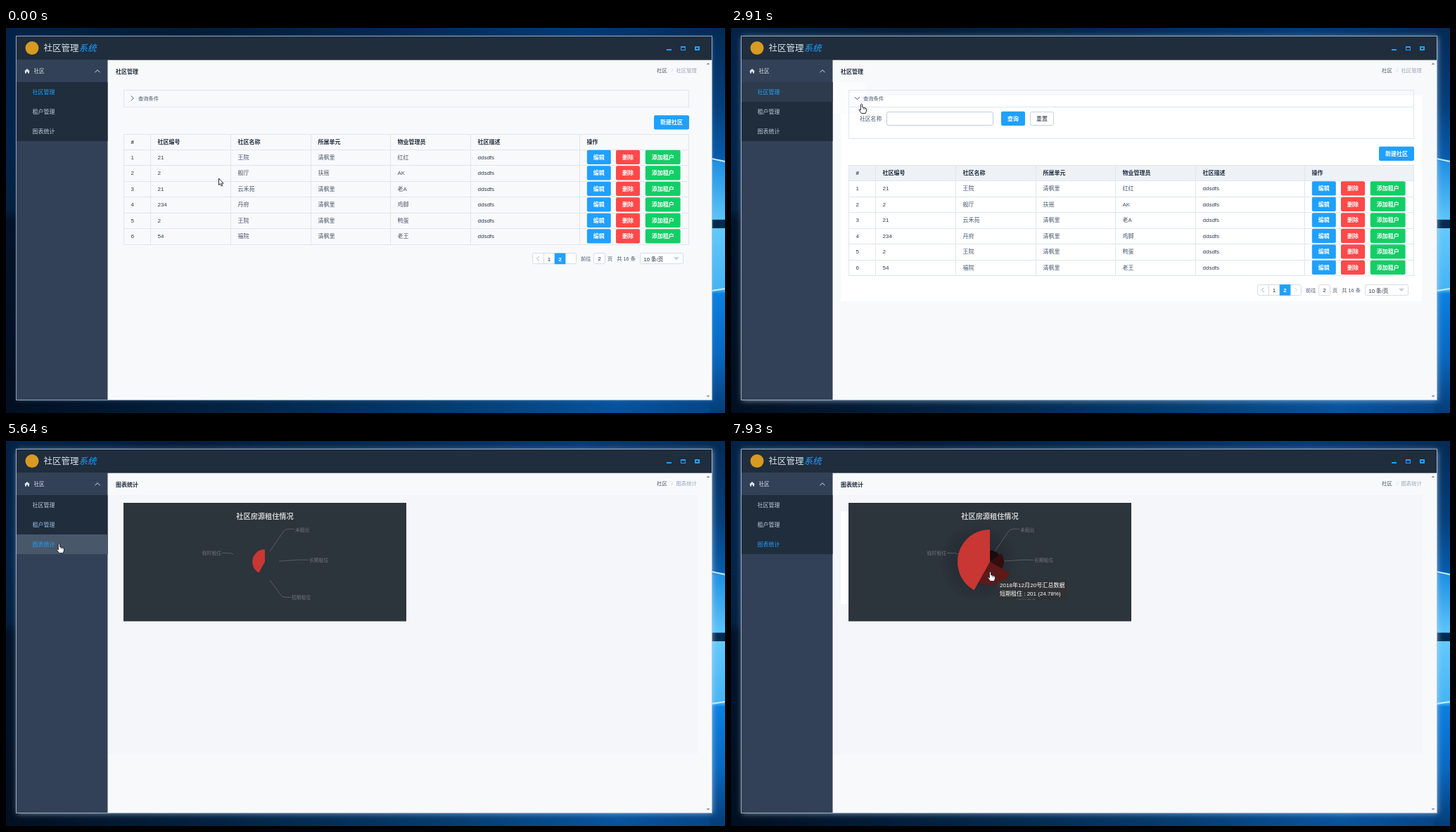
Write an HTML page with a canvas that moves like this. It is 1022 px wide and 548 px high and loops after 8 s.

```html
<!DOCTYPE html>
<html lang="zh">
<head>
<meta charset="utf-8">
<title>社区管理系统</title>
<style>
html, body { margin: 0; width: 100%; height: 100%; overflow: hidden; background: #03162c; }
canvas { display: block; width: 1022px; height: 548px; }
</style>
</head>
<body>
<canvas id="stage" width="1022" height="548"></canvas>
<script>
const c = document.getElementById('stage').getContext('2d');
const LOOP = 8000;
const FONT = '"Liberation Sans", "Noto Sans CJK SC", "Noto Sans CJK", sans-serif';
const BLUE = '#20a0ff', RED = '#ff4949', GREEN = '#13ce66';
const INK = '#1f2d3d', BODY = '#48576a', LINE = '#dfe6ec', EDGE = '#c4d0dd', SIDE = '#324157';

// The picture only changes at these moments.
const TICKS = [0, 120, 240, 520, 650, 790, 930, 1060, 1200, 1330,
  1640, 1760, 1880, 2030, 2180, 2340, 2490, 2760, 2910, 3030, 3150, 3270, 3420,
  3710, 3830, 3980, 4120, 4240, 4520, 4640, 4780, 4920, 5060, 5210,
  5520, 5640, 5760, 5880, 6010, 6150, 6290, 6430, 6550,
  6670, 6790, 6940, 7080, 7210, 7350, 7490, 7630, 7780, 7930];
const FOCUS = 1640, OPEN = 1719, TENANT = 4520, CHART = 5520;
const DROP = 44.5;

// Pointer path: time, x, y.
const PATH = [
  [0, 302, 214], [240, 155, 153], [390, 155, 153], [1330, 180, 100],
  [2640, 180, 100], [2910, 185, 108], [3150, 110, 108], [3420, 96, 119],
  [3600, 96, 119], [4240, 83, 114], [4700, 83, 114], [5210, 75, 146],
  [5760, 75, 146], [6290, 340, 150], [6430, 360, 154], [6550, 365, 156],
  [6670, 369, 159], [7080, 374, 167], [7490, 378, 177], [7630, 378, 179], [7930, 368, 186]
];

const COMMUNITY = {
  cols: [167, 205, 319, 433, 546, 660, 815],
  heads: ['#', '社区编号', '社区名称', '所属单元', '物业管理员', '社区描述', '操作'],
  rows: [
    ['1', '21', '王院', '清枫里', '红红'], ['2', '2', '舰厅', '扶摇', 'AK'],
    ['3', '21', '云禾苑', '清枫里', '老A'], ['4', '234', '丹府', '清枫里', '鸡脚'],
    ['5', '2', '王院', '清枫里', '鸭蛋'], ['6', '54', '福院', '清枫里', '老王']
  ]
};
const TENANTS = {
  cols: [167, 205, 319, 433, 546, 660, 773],
  heads: ['#', '租户编号', '租户姓名', '小区名称', '所属单元', '物业管理员', '操作']
};
const MENU = ['社区管理', '租户管理', '图表统计'];
const SLICES = [
  { name: '未租出', value: 122, color: '#1c0a0c', start: 5650, hover: [6670, 7000] },
  { name: '长期租住', value: 148, color: '#340d10', start: 5700, hover: [7000, 7550] },
  { name: '短期租住', value: 201, color: '#5e1918', start: 5740, hover: [7550, 9000] },
  { name: '临时租住', value: 340, color: '#c83733', start: 5600, hover: [6290, 6670] }
];
const TOTAL = 811;

const clamp = k => Math.max(0, Math.min(1, k));
const smooth = k => (k = clamp(k), k * k * (3 - 2 * k));
const lerp = (a, b, k) => a + (b - a) * k;
const pulse = (t, from, to, d) => clamp((t - from) / d) - clamp((t - to) / d);

function elastic(k) {
  if (k <= 0) return 0;
  if (k >= 1) return 1;
  return 2 ** (-10 * k) * Math.sin((k - 0.1) * Math.PI * 5) + 1;
}

function mix(a, b, k) {
  const at = (s, i) => parseInt(s.substr(1 + i * 2, 2), 16);
  return `rgb(${[0, 1, 2].map(i => Math.round(lerp(at(a, i), at(b, i), k)))})`;
}

function rect(x, y, w, h, color) {
  c.fillStyle = color;
  c.fillRect(x, y, w, h);
}

function frame(x, y, w, h, color) {
  c.strokeStyle = color;
  c.lineWidth = 1;
  c.strokeRect(x + 0.5, y + 0.5, w - 1, h - 1);
}

function rounded(x, y, w, h, fill, stroke) {
  c.beginPath();
  c.roundRect(x + 0.5, y + 0.5, w - 1, h - 1, 2);
  c.fillStyle = fill;
  c.fill();
  c.strokeStyle = stroke;
  c.lineWidth = 1;
  c.stroke();
}

// y is the middle of the line.
function text(s, x, y, size, color, style = '', align = 'left') {
  c.font = `${style} ${size}px ${FONT}`;
  c.textAlign = align;
  c.fillStyle = color;
  c.fillText(s, x, y + size * 0.37);
}

function trace(points, close) {
  c.beginPath();
  points.forEach(([x, y]) => c.lineTo(x, y));
  if (close) c.closePath();
}

function poly(points, color) {
  trace(points, true);
  c.fillStyle = color;
  c.fill();
}

function stroke(points, color, width = 1) {
  trace(points);
  c.strokeStyle = color;
  c.lineWidth = width;
  c.stroke();
}

function chevron(x, y, angle, size, color) {
  c.save();
  c.translate(x, y);
  c.rotate(angle);
  stroke([[-size / 2, -size], [size / 2, 0], [-size / 2, size]], color);
  c.restore();
}

function button(s, x, y, w, color) {
  c.beginPath();
  c.roundRect(x, y, w, 20.2, 2);
  c.fillStyle = color;
  c.fill();
  text(s, x + w / 2, y + 10.2, 8, '#fff', 'bold', 'center');
}

function gradient(x0, y0, x1, y1, stops) {
  const g = c.createLinearGradient(x0, y0, x1, y1);
  stops.forEach(([k, color]) => g.addColorStop(k, color));
  return g;
}

function wallpaper() {
  rect(0, 0, 1022, 548, gradient(0, 0, 0, 548, [[0, '#032247'], [0.3, '#03244a'], [0.47, '#032040'], [0.5, '#01132b'], [1, '#020f22']]));
  rect(15, 0, 1007, 14, gradient(0, 0, 1022, 0, [[0, '#03244a'], [0.25, '#031c38'], [0.55, '#032a54'], [0.8, '#053a74'], [1, '#042a55']]));
  rect(15, 528, 1007, 20, gradient(0, 0, 1022, 0, [[0, '#020f20'], [0.3, '#032242'], [0.6, '#053a6c'], [0.85, '#07539d'], [1, '#064284']]));
  rect(1000, 0, 22, 548, gradient(0, 0, 0, 548, [[0, '#042a55'], [0.2, '#053f7b'], [0.34, '#075cab'], [0.35, '#2ea0ee'], [0.68, '#48b6f6'], [0.69, '#0a7fe0'], [0.85, '#0868c0'], [1, '#053c78']]));
  rect(1000, 190, 22, 82, gradient(0, 190, 0, 272, [[0, '#1d8fe4'], [1, '#5cc4fa']]));
  rect(1000, 273, 22, 12, '#02294f');
  rect(1000, 285, 22, 87, gradient(0, 285, 0, 372, [[0, '#63c9fb'], [1, '#45b4f4']]));
  stroke([[1003, 186], [1022, 190]], '#c8ecff', 2);
  stroke([[1003, 374], [1022, 371]], '#c8ecff', 2);
}

function shell(t, page) {
  c.save();
  c.shadowColor = t < FOCUS ? 'rgba(150,190,225,.4)' : 'rgba(205,228,248,.65)';
  c.shadowBlur = t < FOCUS ? 4 : 8;
  c.shadowOffsetX = c.shadowOffsetY = 1;
  rect(15, 12, 988, 517, '#f8f9fb');
  c.restore();
  rect(15, 12, 988, 33.6, INK);
  rect(15, 45, 129.5, 484, SIDE);
  rect(15, 77, 129.5, 84, INK);

  c.fillStyle = '#d79a22';
  c.beginPath();
  c.arc(37, 28.5, 9.5, 0, 7);
  c.fill();
  text('社区管理', 53.5, 28, 12.5, '#dce4ec');
  text('系统', 103.5, 28, 12.5, BLUE, 'italic');

  rect(939, 30, 7, 2, BLUE);
  frame(959, 26, 7, 6, BLUE);
  rect(959, 26, 7, 2, BLUE);
  rect(979, 26, 7, 6, BLUE);
  rect(981, 28, 3, 2, INK);

  poly([[26, 61.5], [30, 58], [34, 61.5], [33, 61.5], [33, 64.5], [31, 64.5], [31, 62.5], [29, 62.5], [29, 64.5], [27, 64.5], [27, 61.5]], '#dbe3ec');
  text('社区', 39.5, 61.5, 7.6, '#dbe3ec');
  chevron(130, 61.5, -Math.PI / 2, 3.5, '#dbe3ec');

  const hover = [[2810, 3150], [3150, 4920], [4920, 5880]];
  const since = page === 2 ? CHART : TENANT;
  MENU.forEach((name, i) => {
    const y = 77 + i * 28;
    const k = pulse(t, ...hover[i], 300);
    if (k > 0) rect(15, y, 129.5, 28, mix(INK, '#48576a', k));
    const fading = i === page - 1 ? 1 - clamp((t - since + 100) / 300) : 0;
    text(name, 37.5, y + 14.2, 8, mix('#bfcbd9', BLUE, i === page ? 1 : fading));
  });

  frame(14, 11, 990, 519, 'rgba(190,205,220,.75)');
  poly([[995.5, 52], [998, 49.5], [1000.5, 52]], '#8b8f95');
  poly([[995.5, 523], [998, 525.5], [1000.5, 523]], '#8b8f95');
}

function heading(name) {
  text(name, 156, 62, 8, INK, 'bold');
  text('社区', 925, 60.5, 7.4, BODY);
  text('/', 946, 60.5, 7.4, '#bfcbd9');
  text(name, 982, 60.5, 7.4, '#97a8be', '', 'right');
}

function queryPanel(label, open, boxed) {
  const height = open * DROP;
  c.save();
  c.beginPath();
  c.rect(167, 88, 804, 25 + height);
  c.clip();
  if (height > 0) {
    rect(167, 112, 804, 1, LINE);
    text(label, 183, 129, 7.8, BODY);
    rounded(221, 119, 152, 20, '#fff', '#bfcbd9');
    button('查询', 384, 118.7, 34, BLUE);
    rounded(425, 119, 34, 20, '#fff', EDGE);
    text('重置', 442, 128.9, 8, INK, '', 'center');
  }
  c.restore();
  chevron(179.5, 100, open * Math.PI / 2, 3.5, BODY);
  text('查询条件', 188, 100.5, 7.3, BODY);
  frame(167, 88, 804, 25 + Math.round(boxed ? height : DROP), LINE);
}

function tableHead(table, y, bottom, fill) {
  if (fill) rect(167, y, 804, 23, '#eef1f6');
  rect(167, y, 804, 1, LINE);
  table.heads.forEach((h, i) => text(h, table.cols[i] + 10.5, y + 11, 8, INK, 'bold'));
  rect(167, y + 22, 804, 1, LINE);
  table.cols.forEach(x => rect(x, y, 1, bottom - y, LINE));
  rect(970, y, 1, bottom - y, LINE);
}

function pager(y, left, page, total, arrow) {
  const top = Math.round(y - 8);
  const shift = page === 2 ? 0 : 4;
  rounded(left, top, 811 + shift - left, 16, '#fff', '#d3dce6');
  if (page === 2) {
    rect(764, top, 1, 16, '#d3dce6');
    text('1', 772, y + 0.3, 8, INK, '', 'center');
    rect(779.7, y - 7.8, 15.7, 15.7, BLUE);
    text('2', 787.5, y + 0.3, 8, '#fff', 'bold', 'center');
  }
  chevron(left + 8, y, Math.PI, 3, page === 2 ? '#97a8be' : '#d3dce6');
  if (arrow) chevron(803 + shift, y, 0, 3, '#d3dce6');
  text('前往', 817 + shift, y, 7.3, BODY);
  rounded(835 + shift, top, 17, 16, '#fff', '#d3dce6');
  text(page, 843.5 + shift, y, 8, INK, '', 'center');
  text('页', 855 + shift, y, 7.3, BODY);
  text(`共 ${total} 条`, 895, y, 7.3, BODY, '', 'right');
  rounded(901, top, 62, 16, '#fff', '#d3dce6');
  text('10 条/页', 906.5, y + 1, 7.6, INK);
  poly([[949, y - 2], [957, y - 2], [953, y + 2]], '#bfcbd9');
}

function communityPage(t) {
  const open = smooth((t - OPEN) / 300);
  const d = open * DROP;
  if (t > FOCUS) rect(156, 96, 826, 252.5 + d - 4, '#fff');
  if (t >= 2910) rect(145, 77, 47, 45, '#fbfcfd');
  heading(MENU[0]);
  queryPanel('社区名称', open, true);
  button('新建社区', 921, 124.2 + d, 50, BLUE);
  const top = 150.6 + d;
  const edge = Math.round(top);
  tableHead(COMMUNITY, edge, edge + 157, t >= FOCUS);
  COMMUNITY.rows.forEach((row, i) => {
    const y = top + 33.3 + i * 22.5;
    [...row, 'ddsdfs'].forEach((s, j) => text(s, COMMUNITY.cols[j] + 10.5, y, 8, j === 0 || j === 1 || j === 5 ? '#2f3d4f' : BODY));
    rect(167, Math.round(y + 11.3), 804, 1, LINE);
    button('编辑', 825.8, y - 10.1, 34, BLUE);
    button('删除', 867, y - 10.1, 34, RED);
    button('添加租户', 908.8, y - 10.1, 49.8, GREEN);
  });
  pager(328.3 + d, 748, 2, 16, t >= FOCUS);
}

function tenantPage() {
  heading(MENU[1]);
  queryPanel('租户姓名', 1, false);
  tableHead(TENANTS, 157, 180, true);
  rect(167, 180, 804, 1, LINE);
  frame(167, 157, 804, 57, LINE);
  text('暂无数据', 569, 197.5, 8, '#5e7382', '', 'center');
  pager(234.5, 784, 1, 0, true);
}

function leader([a, b, e]) {
  c.beginPath();
  c.moveTo(...a);
  c.lineTo(lerp(a[0], b[0], 0.88), lerp(a[1], b[1], 0.88));
  c.quadraticCurveTo(...b, lerp(b[0], e[0], 0.4), lerp(b[1], e[1], 0.4));
  c.lineTo(...e);
  c.strokeStyle = 'rgba(255,255,255,.3)';
  c.lineWidth = 0.7;
  c.stroke();
}

function pie(t) {
  const cx = 368, cy = 172;
  const dark = smooth((t - 5640) / 300) * 0.2;
  const glow = c.createRadialGradient(352, cy, 30, 352, cy, 58);
  glow.addColorStop(0, `rgba(10,14,20,${dark})`);
  glow.addColorStop(1, 'rgba(10,14,20,0)');
  rect(290, 110, 130, 130, glow);

  const faint = 'rgba(255,255,255,.32)';
  leader([[375, 157], [397, 125], [410, 125.5]]);
  leader([[388, 171], [418, 169], [430, 169.5]]);
  leader([[375, 198], [393, 222.5], [405, 222.5]]);
  leader([[323, 161], [319, 159.5], [307, 159.5]]);
  text('未租出', 411, 126, 6.8, faint);
  text('长期租住', 431, 169.5, 6.8, faint);
  text('短期租住', 406, 222.5, 6.8, faint);
  text('临时租住', 306, 159.5, 6.8, faint, '', 'right');

  let a = -Math.PI / 2;
  SLICES.forEach(s => {
    const end = a + s.value / TOTAL * Math.PI * 2;
    const hot = smooth(pulse(t, ...s.hover, 130));
    const r = s.value * 0.1355 * elastic((t - s.start) / 1000) + 6 * hot;
    if (r > 0) {
      c.beginPath();
      c.moveTo(cx, cy);
      c.arc(cx, cy, r, a, end);
      c.fillStyle = mix(s.color, s.value === 340 ? '#e33d38' : s.color, hot);
      c.fill();
    }
    a = end;
  });
}

function tooltip(t, x, y) {
  const s = SLICES.find(({ hover: [from, to] }) => t >= from && t < to);
  if (!s) return;
  const left = Math.round(x + lerp(-1, 11, clamp((t - 6430) / 240)));
  const top = Math.round(y + 11.5);
  c.beginPath();
  c.roundRect(left, top, 99, 27, 2);
  c.fillStyle = 'rgba(48,49,51,.82)';
  c.fill();
  const share = (s.value / TOTAL * 100).toFixed(2);
  text('2018年12月20号汇总数据', left + 3, top + 6.7, 8.1, '#fff');
  text(`${s.name} : ${s.value} (${share}%)`, left + 3, top + 18.7, 8, '#fff');
}

function chartPage(t, x, y) {
  rect(145, 77, 838, 369, '#f5f6f9');
  if (t >= 6290) rect(156, 100, 12, 132, '#fff');
  heading(MENU[2]);
  rect(167, 88, 402, 168.6, '#2c343c');
  text('社区房源租住情况', 368, 107.3, 10.2, '#ccc', 'bold', 'center');
  pie(t);
  tooltip(t, x, y);
}

function pointer(t) {
  const i = PATH.findIndex(p => p[0] > t);
  if (i < 0) return PATH[PATH.length - 1].slice(1);
  const [a, b] = [PATH[i - 1], PATH[i]];
  const k = (t - a[0]) / (b[0] - a[0]);
  return [lerp(a[1], b[1], k), lerp(a[2], b[2], k)];
}

function cursor(x, y, hand) {
  const arrow = [[0, 0], [0, 9.5], [2.2, 7.6], [3.7, 11], [5.2, 10.3], [3.8, 7.1], [6.6, 7]];
  const palm = [[-1.2, 1], [0, 0.2], [1.2, 1], [1.2, 4.8], [5, 5.6], [7, 7], [7, 10], [5.6, 13.5], [0, 13.5], [-3.6, 8.6], [-2.8, 7.5], [-1.2, 9]];
  c.save();
  c.translate(x + 0.5, y);
  c.lineJoin = 'round';
  poly(hand ? palm : arrow, '#fff');
  c.strokeStyle = '#111820';
  c.lineWidth = 0.9;
  c.stroke();
  if (hand) {
    stroke([[3, 5.4], [3, 8]], '#111820', 0.6);
    stroke([[5, 6], [5, 8.4]], '#111820', 0.6);
  }
  c.restore();
}

function draw(now) {
  const t = TICKS.filter(tick => tick <= now).pop();
  const page = t < TENANT ? 0 : t < CHART ? 1 : 2;
  const [x, y] = pointer(t);
  wallpaper();
  shell(t, page);
  if (page === 0) communityPage(t);
  else if (page === 1) tenantPage();
  else chartPage(t, x, y);
  cursor(x, y, t > 520 && y < 113 || t > FOCUS);
}

const start = performance.now();
function loop() {
  draw((performance.now() - start) % LOOP);
  requestAnimationFrame(loop);
}
loop();
</script>
</body>
</html>
```
